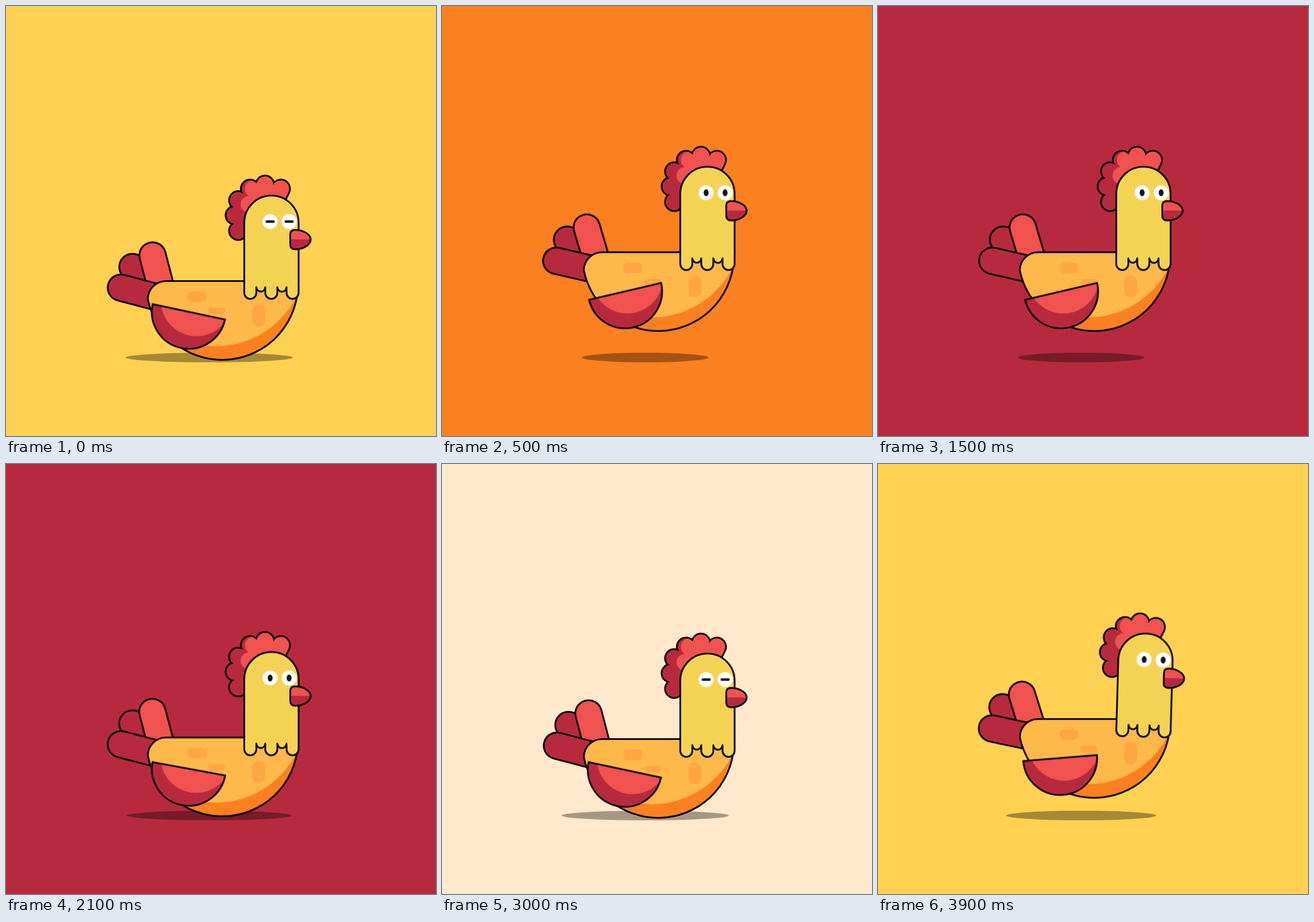
An HTML page that plays this animation: 748 by 748 pixels, repeating every 4 s.

```html
<!DOCTYPE html>
<html lang="en">
<head>
<meta charset="utf-8">
<title>Hopping chicken</title>
<style>
  :root {
    --yellow: #ffd152;
    --orange: #fb8020;
    --dark: #b72a3e;
    --red: #f0524f;
    --cream: #ffe8cb;
  }
  html, body { margin: 0; width: 100%; height: 100%; overflow: hidden; }
  body { background: var(--yellow); animation: backdrop 4s step-end infinite; }
  svg { display: block; width: 748px; height: 748px; }

  .line { stroke: #050505; stroke-width: 3; stroke-linejoin: round; }
  .dark { fill: var(--dark); }
  .red { fill: var(--red); }

  .shadow, .bird, .tail, .wing, .head, .pupil {
    animation: 1s ease-in-out infinite;
  }
  .shadow { transform-origin: 353.5px 611.5px; animation-name: shadow; }
  .bird { animation-name: hop; }
  .tail { transform-origin: 300px 528px; animation-name: tail; }
  .wing { animation-name: flap; }
  .head { transform-origin: 462px 500px; animation-name: nod; }
  .pupil { fill: #11151f; animation-name: blink; }

  @keyframes backdrop {
    0% { background: var(--yellow); }
    12.5% { background: var(--orange); }
    37.5% { background: var(--dark); }
    62.5% { background: var(--cream); }
    87.5%, 100% { background: var(--yellow); }
  }
  @keyframes shadow {
    0%, 100% { transform: scaleX(1); }
    75% { transform: scaleX(.686); }
  }
  /* rises, drifts past the middle height, then drops hard */
  @keyframes hop {
    0% { transform: translateY(0); animation-timing-function: cubic-bezier(.42, 0, .8, .75); }
    50% { transform: translateY(-50px); animation-timing-function: cubic-bezier(.3, -.5, .9, .1); }
    100% { transform: translateY(0); }
  }
  @keyframes tail {
    0%, 100% { transform: rotate(0); }
    50% { transform: rotate(-1.9deg); }
    75% { transform: rotate(-8.5deg); }
  }
  @keyframes flap {
    0% { transform: translate(318px, 532px) rotate(12deg); animation-timing-function: ease-in; }
    50% { transform: translate(318.5px, 546.5px) rotate(-13.1deg); animation-timing-function: ease-out; }
    75% { transform: translate(317.5px, 556px) rotate(-26deg); animation-timing-function: ease-in; }
    90% { transform: translate(316.8px, 546.5px) rotate(-4.8deg); animation-timing-function: linear; }
    100% { transform: translate(318px, 532px) rotate(12deg); }
  }
  @keyframes nod {
    0%, 50%, 100% { transform: rotate(0); }
    75% { transform: rotate(5deg); }
  }
  @keyframes blink {
    0%, 100% { x: -8px; y: -2.2px; width: 16px; height: 4.4px; rx: 2.2px; ry: 2.2px; }
    10%, 92% { x: -4.3px; y: -6px; width: 8.6px; height: 12px; rx: 4.3px; ry: 6px; }
  }
</style>
</head>
<body>
<svg viewBox="0 0 748 748">
  <defs>
    <path id="belly" d="M509 478.5H278A31.5 31.5 0 0 0 246.7 510A132 132 0 0 0 508 481Z"/>
    <path id="fan" d="M-64.3 0H64.3A64.3 64.3 0 0 1 -64.3 0Z"/>
    <path id="beak" d="M494.5 397Q494.5 389.5 503 389.5C517 389.5 530 397 530 406.3C530 415.5 517 423.3 503 423.3Q494.5 423.3 494.5 415Z"/>
    <clipPath id="bellyClip"><use href="#belly"/></clipPath>
    <clipPath id="fanClip"><use href="#fan"/></clipPath>
    <clipPath id="beakClip"><use href="#beak"/></clipPath>
    <clipPath id="combClip">
      <circle cx="404" cy="391" r="14.5"/>
      <circle cx="398" cy="364" r="14.5"/>
      <circle cx="404" cy="338" r="14.5"/>
      <circle cx="424.5" cy="318" r="14.5"/>
      <circle cx="450.5" cy="311" r="14.5"/>
      <circle cx="478" cy="318" r="14.5"/>
      <path d="M404 391L398 364L404 338L424.5 318L450.5 311L478 318L491 324.5L483 340L460 390Z"/>
    </clipPath>
  </defs>

  <ellipse class="shadow" cx="353.5" cy="611.5" rx="145.5" ry="8.3" opacity=".35"/>

  <g class="bird">
    <g class="tail line">
      <rect class="dark" x="-23" y="-23" width="46" height="90" rx="23" transform="translate(220 454) rotate(-45)"/>
      <rect class="red" x="-23" y="-23" width="46" height="100" rx="23" transform="translate(255 434) rotate(-14.6)"/>
      <rect class="dark" x="-23" y="-23" width="46" height="110" rx="23" transform="translate(200 490) rotate(-75.2)"/>
    </g>

    <g clip-path="url(#bellyClip)">
      <rect x="240" y="470" width="280" height="150" fill="#fb8020"/>
      <circle cx="365" cy="435" r="157" fill="#ffb84a"/>
    </g>
    <g fill="#fea544">
      <rect x="315.5" y="496.5" width="33.5" height="18.5" rx="9"/>
      <rect x="352" y="525" width="29" height="12" rx="6"/>
      <rect x="428.5" y="519.5" width="22.5" height="37.5" rx="10.5"/>
    </g>
    <use href="#belly" class="line" fill="none"/>

    <g class="wing">
      <use href="#fan" class="dark"/>
      <circle class="red" cx="9" cy="-22" r="62" clip-path="url(#fanClip)"/>
      <use href="#fan" class="line" fill="none" style="stroke-linejoin:miter"/>
    </g>

    <g class="head">
      <path d="M404 391h.01M398 364h.01M404 338h.01M424.5 318h.01M450.5 311h.01M478 318L470.5 333"
            fill="none" stroke="#050505" stroke-width="35" stroke-linecap="round"/>
      <g clip-path="url(#combClip)">
        <rect class="dark" x="375" y="290" width="125" height="120"/>
        <circle class="red" cx="430.5" cy="318" r="15"/>
        <circle class="red" cx="422.5" cy="345" r="14.5"/>
        <path class="red" d="M422 345L430 318L434 290H500V350H424Z"/>
      </g>

      <path class="line" fill="#f4d354" d="M414.5 377A47.25 47.25 0 0 1 509 377V499
        a10.5 10.5 0 0 1 -21 0V489a8 8 0 0 1 -16 0V499
        a10.5 10.5 0 0 1 -21 0V489a7.75 7.75 0 0 1 -15.5 0V499
        a10.5 10.5 0 0 1 -21 0Z"/>

      <g transform="translate(459.5 375)">
        <circle r="13" fill="#fff"/>
        <rect class="pupil"/>
      </g>
      <g transform="translate(492.5 375)">
        <circle r="13" fill="#fff"/>
        <rect class="pupil"/>
      </g>

      <g clip-path="url(#beakClip)">
        <rect class="red" x="490" y="385" width="45" height="21"/>
        <rect class="dark" x="490" y="406" width="45" height="21"/>
      </g>
      <use href="#beak" class="line" fill="none"/>
    </g>
  </g>
</svg>
</body>
</html>
```
